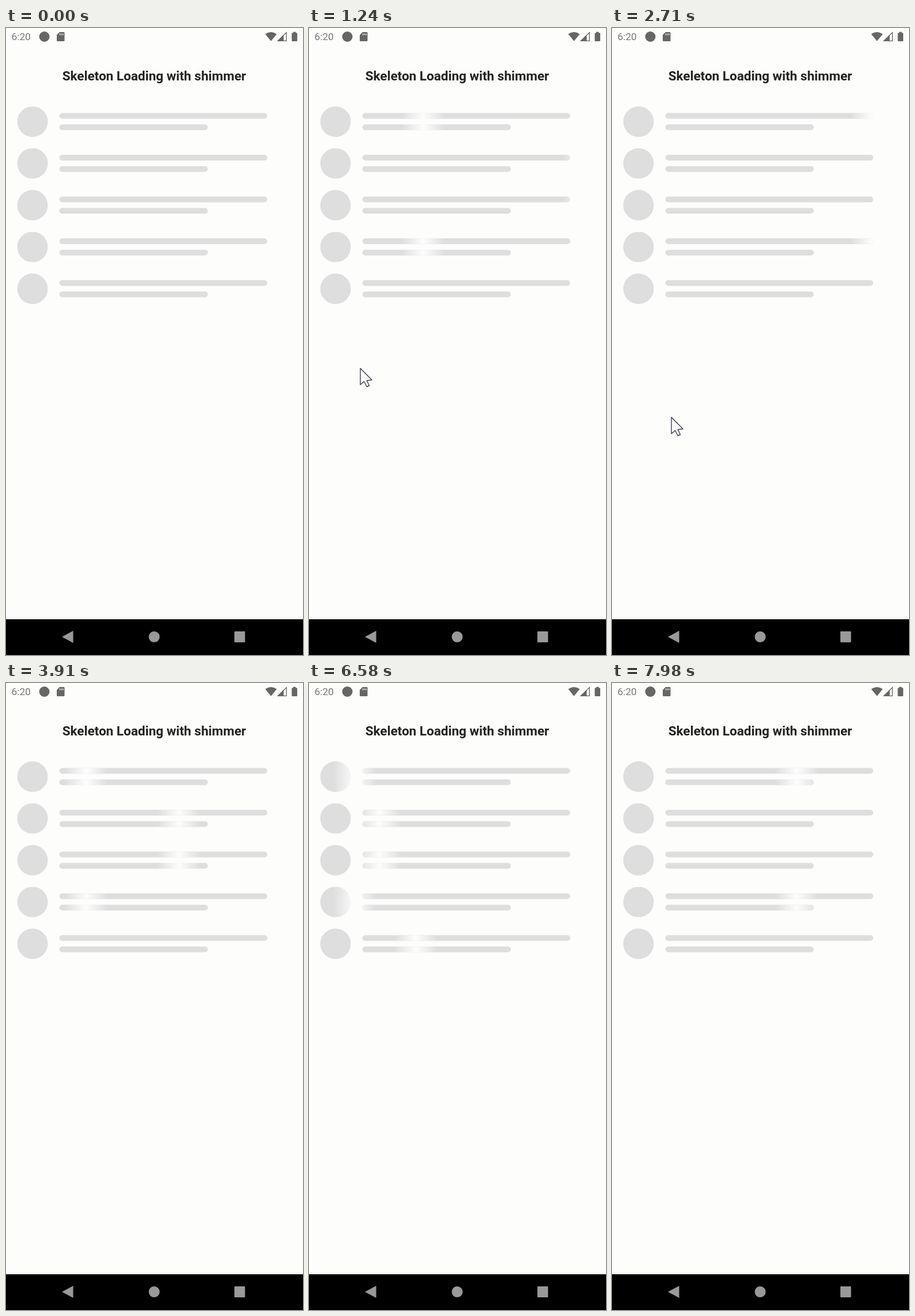
An HTML page for the animation above (8000 ms loop, 515 px wide and 1088 px high).

```html
<!DOCTYPE html>
<html lang="en">
<head>
<meta charset="utf-8">
<title>Skeleton Loading</title>
<style>
  html, body { margin: 0; width: 100%; height: 100%; overflow: hidden; background: #fdfdfc; }
  svg { display: block; width: 100%; height: 100%; }
  text { font-family: Roboto, sans-serif; }
  .icons { fill: #666; }
  .nav { fill: #999; }
  .bone { fill: #dedede; }

  /* All rows restart together; each sweeps at its own speed and then waits off screen. */
  .slow { --far: 509.4px; }
  .mid  { --far: 1528px; }
  .fast { --far: 3056px; }
  .glow { fill: url(#shine); animation: sweep 8s linear infinite; }
  @keyframes sweep {
    0%, 4.749% { transform: translateX(var(--far)); }
    4.75%, 5.35% { transform: translateX(0); }
    42.437% { transform: translateX(var(--far)); }
    42.438%, 43.038% { transform: translateX(0); }
    80.124% { transform: translateX(var(--far)); }
    80.125%, 80.725% { transform: translateX(0); }
    100% { transform: translateX(calc(var(--far) * .52)); }
  }

  .pointer { animation: point 8s linear infinite; }
  @keyframes point {
    0%, 9.75% { transform: translate(-24px, 560px); }
    10.6% { transform: translate(13px, 568px); animation-timing-function: ease-out; }
    15.5% { transform: translate(89px, 590px); animation-timing-function: ease-in-out; }
    20.9% { transform: translate(104px, 682px); animation-timing-function: ease-out; }
    26%, 39.62% { transform: translate(103px, 675px); }
    39.625%, 100% { transform: translate(-24px, 560px); }
  }
</style>
</head>
<body>
<svg viewBox="0 0 515 1088">
  <defs>
    <linearGradient id="shine">
      <stop offset="0" stop-color="#fefefe" stop-opacity="0"/>
      <stop offset=".5" stop-color="#fefefe" stop-opacity=".96"/>
      <stop offset="1" stop-color="#fefefe" stop-opacity="0"/>
    </linearGradient>
    <clipPath id="row">
      <circle cx="46" cy="26.5" r="26.5"/>
      <rect x="92.5" y="11.5" width="360.5" height="10" rx="5"/>
      <rect x="92.5" y="31.3" width="257.5" height="10" rx="5"/>
    </clipPath>
  </defs>

  <rect width="515" height="1088" fill="#fdfdfc"/>

  <text x="9.5" y="21" font-size="17.3" fill="#777">6:20</text>
  <g class="icons">
    <circle cx="66.5" cy="15" r="9"/>
    <path d="M93 7H100Q101.500 7 101.500 8.500V21.500Q101.500 23 100 23H89.500Q88 23 88 21.500V12Z"/>
    <path d="M93.500 9.500v3M96.200 9.500v3M98.900 9.500v3" stroke="#fdfdfc" stroke-width="1.200"/>
    <path d="M449.500 10.500Q459.500 3.500 469.500 10.500L459.500 22.800Z"/>
    <path d="M471.500 22.300L486.300 7.800V22.300Z" fill="none" stroke="#666" stroke-width="1.300"/>
    <path d="M470.500 23L481.500 12V23Z"/>
    <path d="M498 8.500V6.800H502.500V8.500H504Q505 8.500 505 9.500V22Q505 23 504 23H496.500Q495.500 23 495.500 22V9.500Q495.500 8.500 496.500 8.500Z"/>
  </g>

  <text x="257" y="91.300" font-size="22.500" font-weight="700" text-anchor="middle" fill="#222">Skeleton Loading with shimmer</text>

  <g class="slow" transform="translate(0 136)" clip-path="url(#row)">
    <rect class="bone" width="515" height="53"/><rect class="glow" x="20.500" width="76" height="53"/>
  </g>
  <g class="mid" transform="translate(0 208.500)" clip-path="url(#row)">
    <rect class="bone" width="515" height="53"/><rect class="glow" x="20.500" width="76" height="53"/>
  </g>
  <g class="mid" transform="translate(0 281)" clip-path="url(#row)">
    <rect class="bone" width="515" height="53"/><rect class="glow" x="20.500" width="76" height="53"/>
  </g>
  <g class="slow" transform="translate(0 353.500)" clip-path="url(#row)">
    <rect class="bone" width="515" height="53"/><rect class="glow" x="20.500" width="76" height="53"/>
  </g>
  <g class="fast" transform="translate(0 426)" clip-path="url(#row)">
    <rect class="bone" width="515" height="53"/><rect class="glow" x="20.500" width="76" height="53"/>
  </g>

  <rect y="1026" width="515" height="62"/>
  <g class="nav">
    <path d="M97 1056.500L116.500 1046V1067Z"/>
    <circle cx="257" cy="1056.500" r="9.500"/>
    <rect x="396" y="1047" width="18.500" height="19" rx="1"/>
  </g>

  <path class="pointer" d="M0 .5V29L6.500 23.500L11.300 32.500L15.500 30.500L11.200 21.800L20 20.700Z"
        fill="#fff" stroke="#3c3c50" stroke-width="1.400" stroke-linejoin="round"/>
</svg>
</body>
</html>
```
